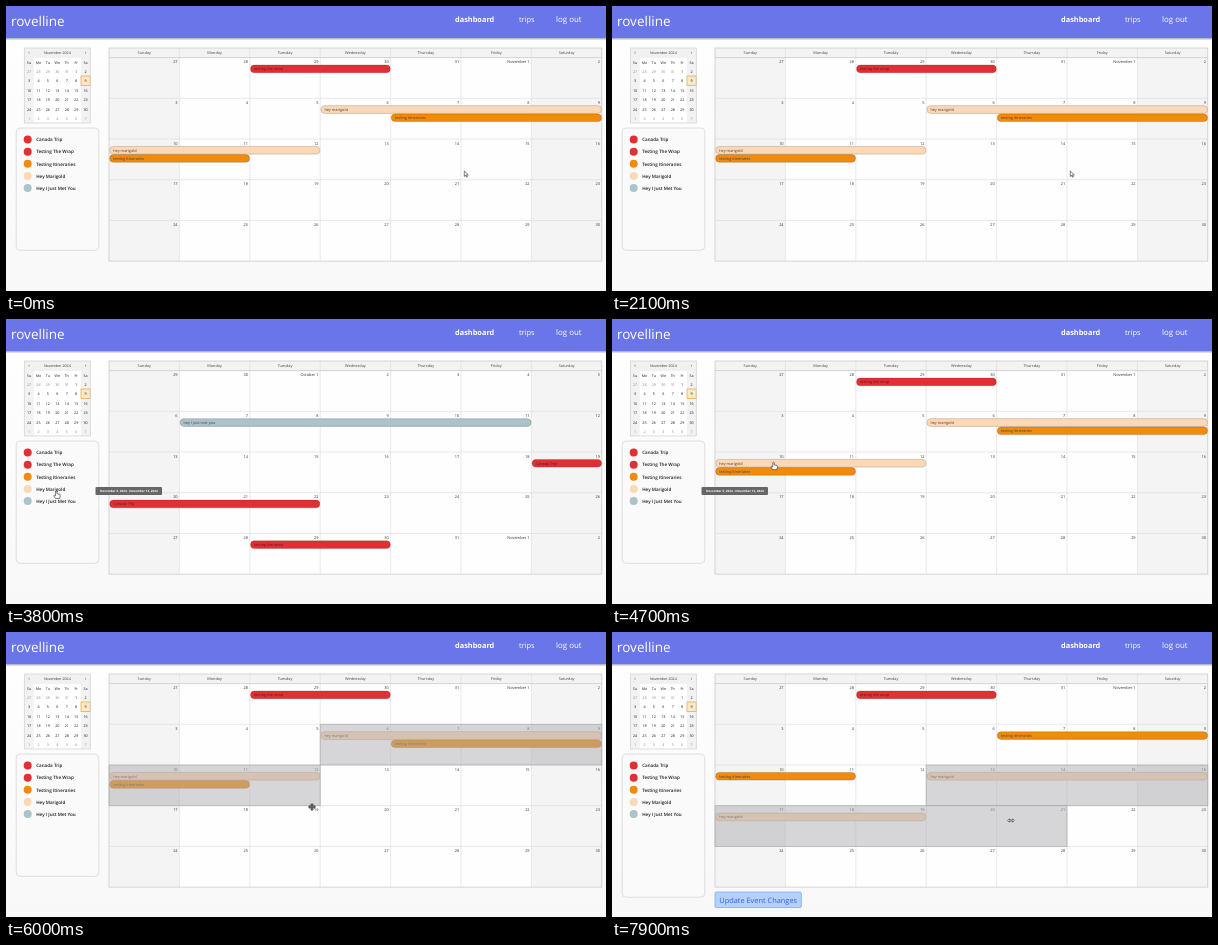
Write an HTML page that moves like this. It is 600 by 285 pixels and loops after 8000 ms.

```html
<!DOCTYPE html>
<html lang="en">
<head>
<meta charset="utf-8">
<title>Trip calendar</title>
<style>
  html, body { margin: 0; width: 100%; height: 100%; overflow: hidden; background: #fbfbfc; }
  svg { display: block; width: 100vw; height: 100vh; }
  text { font-family: "Open Sans", "Noto Sans", sans-serif; text-rendering: geometricPrecision; }
</style>
</head>
<body>
<svg id="stage" viewBox="0 0 600 285" preserveAspectRatio="none"></svg>
<script>
const LEFT = 103, TOP = 51.6, COL = 70.4, ROW = 40.7;
const RED = '#e03034', ORANGE = '#f28a0c', PEACH = '#fbd8b6', BLUE = '#abc3ca';
const DAYS = ['Sunday', 'Monday', 'Tuesday', 'Wednesday', 'Thursday', 'Friday', 'Saturday'];

const rect = (x, y, w, h, fill, extra = '') =>
  `<rect x="${x}" y="${y}" width="${w}" height="${h}" fill="${fill}" ${extra}/>`;
const text = (x, y, size, str, fill = '#333', extra = '') =>
  `<text x="${x}" y="${y}" font-size="${size}" fill="${fill}" ${extra}>${str}</text>`;
const line = (x1, y1, x2, y2, color) =>
  `<path d="M${x1} ${y1}L${x2} ${y2}" stroke="${color}" stroke-width=".6"/>`;
const group = (id, body, hidden = true) =>
  `<g id="${id}"${hidden ? ' display="none"' : ''}>${body}</g>`;
const MID = 'text-anchor="middle"', END = 'text-anchor="end"';

function navbar() {
  return rect(0, 0, 600, 34.5, 'url(#shade)') + rect(0, 0, 600, 32, '#6a75e9') +
    text(5, 20.3, 13.5, 'rovelline', '#fff') +
    text(449, 16.4, 7.4, 'dashboard', '#fff', 'font-weight="700"') +
    text(513, 16.4, 7.4, 'trips', '#fff') +
    text(550, 16.4, 7.9, 'log out', '#fff');
}

function miniCalendar() {
  const x0 = 18.3, pitch = 9.43, mid = c => x0 + pitch * (c + .5);
  let s = rect(x0, 42, 66, 75, '#fff') + rect(x0, 42, 66, 10, '#f1f1f1') +
    rect(x0, 52, pitch, 65, '#f2f2f2') + rect(x0 + 6 * pitch, 52, pitch, 65, '#f2f2f2') +
    text(51.3, 48.4, 3.6, 'November 2024', '#333', MID) +
    text(23, 48.4, 5, '‹', '#444', MID) + text(79.6, 48.4, 5, '›', '#444', MID) +
    rect(75, 70, 9.2, 9.4, '#fde8c8', 'stroke="#e5a545" stroke-width=".7"');
  DAYS.forEach((d, c) => s += text(mid(c), 57.6, 3.7, d.slice(0, 2), '#222', MID));
  for (let i = 0; i < 42; i++) {
    const date = new Date(2024, 9, 27 + i);
    s += text(mid(i % 7), 67 + 9.4 * Math.floor(i / 7), 3.7, date.getDate(),
      date.getMonth() === 10 ? '#111' : '#888', MID);
  }
  return s + rect(x0, 42, 66, 75, 'none', 'stroke="#cfcfcf" stroke-width=".7"');
}

function tripList() {
  const trips = [['Canada Trip', RED], ['Testing The Wrap', RED], ['Testing Itineraries', ORANGE],
    ['Hey Marigold', PEACH], ['Hey I Just Met You', BLUE]];
  return rect(10.2, 122, 82.6, 122.3, '#fafafb', 'id="panel" rx="4" stroke="#d6d6de" stroke-width=".8"') +
    trips.map(([name, color], i) => {
      const y = 133.6 + 12.1 * i;
      return `<circle cx="21.7" cy="${y}" r="4" fill="${color}"/>` +
        text(30.2, y + 1.7, 4.55, name, '#1b1b1b', 'font-weight="600"');
    }).join('');
}

function grid() {
  const w = COL * 7, h = ROW * 5;
  let s = rect(LEFT, TOP, w, h, '#fefefe') + rect(LEFT, 42, w, TOP - 42, '#f3f3f3') +
    rect(LEFT, TOP, COL, h, '#f4f4f4') + rect(LEFT + 6 * COL, TOP, COL, h, '#f4f4f4');
  DAYS.forEach((d, c) => {
    s += text(LEFT + COL * (c + .5), 48.4, 3.85, d, '#444', MID);
    if (c) s += line(LEFT + COL * c, 42, LEFT + COL * c, TOP + h, '#dcdcdc');
  });
  for (let r = 1; r < 5; r++) s += line(LEFT, TOP + ROW * r, LEFT + w, TOP + ROW * r, '#d9d9d9');
  return s + line(LEFT, TOP, LEFT + w, TOP, '#bdbdbd') +
    rect(LEFT, 42, w, TOP - 42 + h, 'none', 'stroke="#c4c4c4" stroke-width=".7"');
}

// Day numbers for five weeks beginning at the given date
function numbers(month, day) {
  let s = '';
  for (let i = 0; i < 35; i++) {
    const date = new Date(2024, month, day + i), n = date.getDate();
    const label = n === 1 ? date.toLocaleString('en-US', { month: 'long' }) + ' 1' : n;
    s += text(LEFT + COL * (i % 7 + 1) - 1.8, TOP + ROW * Math.floor(i / 7) + 5.7, 3.9, label, '#333', END);
  }
  return s;
}

function bar(row, from, to, slot, color, label) {
  const x = LEFT + COL * from + .7, y = TOP + ROW * row + 7.4 + 8.2 * slot;
  const edge = color === PEACH ? '#b39b83' : 'rgba(70,40,30,.45)';
  return rect(x, y, COL * (to - from + 1) - 1, 7.7, color, `rx="3.8" stroke="${edge}" stroke-width=".5"`) +
    text(x + 3.5, y + 5.2, 3.85, label, color === RED ? '#6b1518' : '#4a4038');
}

const wrap = row => bar(row, 2, 3, 0, RED, 'testing the wrap');
const plans = slot => bar(1, 4, 6, slot, ORANGE, 'testing itineraries') +
  bar(2, 0, 1, slot, ORANGE, 'testing itineraries');
const party = row => bar(row, 3, 6, 0, PEACH, 'hey marigold') + bar(row + 1, 0, 2, 0, PEACH, 'hey marigold');

const october = numbers(8, 29) + bar(1, 1, 5, 0, BLUE, 'hey I just met you') +
  bar(2, 6, 6, 0, RED, 'Canada Trip') + bar(3, 0, 2, 0, RED, 'Canada Trip') + wrap(4);
const november = numbers(9, 27) + wrap(0) + party(1) + plans(1);
const moved = numbers(9, 27) + wrap(0) + party(2) + plans(0);

// Shaded range from Wednesday of one week into the next
function range(row, last) {
  const style = 'stroke="#aaa" stroke-opacity=".8" stroke-width=".8"';
  const fill = 'rgba(175,174,178,.5)';
  return rect(LEFT + COL * 3, TOP + ROW * row, COL * 4, ROW, fill, style) +
    rect(LEFT, TOP + ROW * (row + 1), COL * (last + 1), ROW, fill, style);
}

const tip = rect(89.5, 168, 66.5, 8, '#666', 'rx="1"') +
  text(122.8, 173.2, 3, 'November 6, 2024 - November 12, 2024', '#fff', MID + ' font-weight="700"');
const button = rect(103, 260, 86.3, 15.6, '#b4d0fb', 'rx="1.5" stroke="#7fa8ee" stroke-width=".8"') +
  text(146.2, 270.8, 7.4, 'Update Event Changes', '#3166d6', MID);

const shape = (d, fill = '#fff') =>
  `<path d="${d}" fill="${fill}" stroke="#222" stroke-width=".6" stroke-linejoin="round"/>`;
const pointers = {
  arrow: shape('M0 0V5.4L1.3 4.2 2.2 6.2 3.1 5.8 2.2 3.9H4Z'),
  hand: shape('M-.7 .3Q0-.5 .7 .3V2.6L3.6 3.3Q4.2 3.6 4 4.5L3.3 7.4H-.8L-2.6 4.6Q-2.4 3.7-.7 4.6Z'),
  move: shape('M0-3.6 1.4-2H.6V-.6H2V-1.4L3.6 0 2 1.4V.6H.6V2H1.4L0 3.6-1.4 2H-.6V.6H-2V1.4L-3.6 0-2-1.4V-.6H-.6V-2H-1.4Z', '#777'),
  resize: shape('M-3.4 0-1.6-1.6V-.5H1.6V-1.6L3.4 0 1.6 1.6V.5H-1.6V1.6Z')
};

const stage = document.getElementById('stage');
stage.innerHTML = `<defs>
  <linearGradient id="page" x2="0" y2="1"><stop stop-color="#fff"/><stop offset="1" stop-color="#f8f8f9"/></linearGradient>
  <linearGradient id="shade" x2="0" y2="1"><stop offset=".92" stop-color="#9a9ab8"/><stop offset="1" stop-color="#fff"/></linearGradient>
</defs>` + rect(0, 0, 600, 285, 'url(#page)') + navbar() + miniCalendar() + tripList() + grid() +
  group('october', october) + group('november', november) + group('moved', moved) +
  group('shading', '', false) + group('button', button) + group('tip', tip) +
  group('pointer', Object.keys(pointers).map(k => group(k, pointers[k])).join(''), false);

const $ = id => document.getElementById(id);
const show = (id, on) => on ? $(id).removeAttribute('display') : $(id).setAttribute('display', 'none');

// Steps: [start ms, value]
const views = [[0, 'november'], [2900, 'october'], [4600, 'november'], [7400, 'moved']];
const kinds = [[0, 'arrow'], [2800, 'hand'], [5700, 'move'], [7500, 'resize']];
const shades = [[0, ''], [5700, range(1, 2)], [6100, range(2, 2)], [7400, ''], [7600, range(2, 2)],
  [7800, range(2, 3)], [7900, range(2, 4)]];
const path = [[0, 458.3, 165], [2500, 458.3, 165], [2800, 52, 184], [3300, 52, 184], [3700, 50.3, 172],
  [4500, 50.3, 172], [4700, 161.5, 143.3], [5000, 166, 143.5], [5500, 302, 144], [5700, 304, 150],
  [6000, 306, 175], [6300, 299, 191], [7300, 299, 191], [7600, 312, 187], [7900, 399, 188.5], [8000, 399, 188.5]];

const at = (steps, t) => steps.filter(s => s[0] <= t).pop()[1];

function position(t) {
  const i = path.findIndex(p => p[0] > t), a = path[i - 1], b = path[i];
  const k = (t - a[0]) / (b[0] - a[0]), e = k * k * (3 - 2 * k);
  return [a[1] + (b[1] - a[1]) * e, a[2] + (b[2] - a[2]) * e];
}

let last = -1;
function draw(now) {
  const t = Math.floor((now % 8000) / 100) * 100;
  if (t !== last) {
    last = t;
    const view = at(views, t), kind = at(kinds, t);
    ['october', 'november', 'moved'].forEach(v => show(v, v === view));
    Object.keys(pointers).forEach(k => show(k, k === kind));
    $('shading').innerHTML = at(shades, t);
    show('tip', t >= 3700 && t < 4800);
    show('button', view === 'moved');
    $('panel').setAttribute('height', view === 'moved' ? 143.2 : 122.3);
    $('pointer').setAttribute('transform', `translate(${position(t)})`);
  }
}

const start = performance.now();
function tick() {
  draw(performance.now() - start);
  requestAnimationFrame(tick);
}
tick();
</script>
</body>
</html>
```
